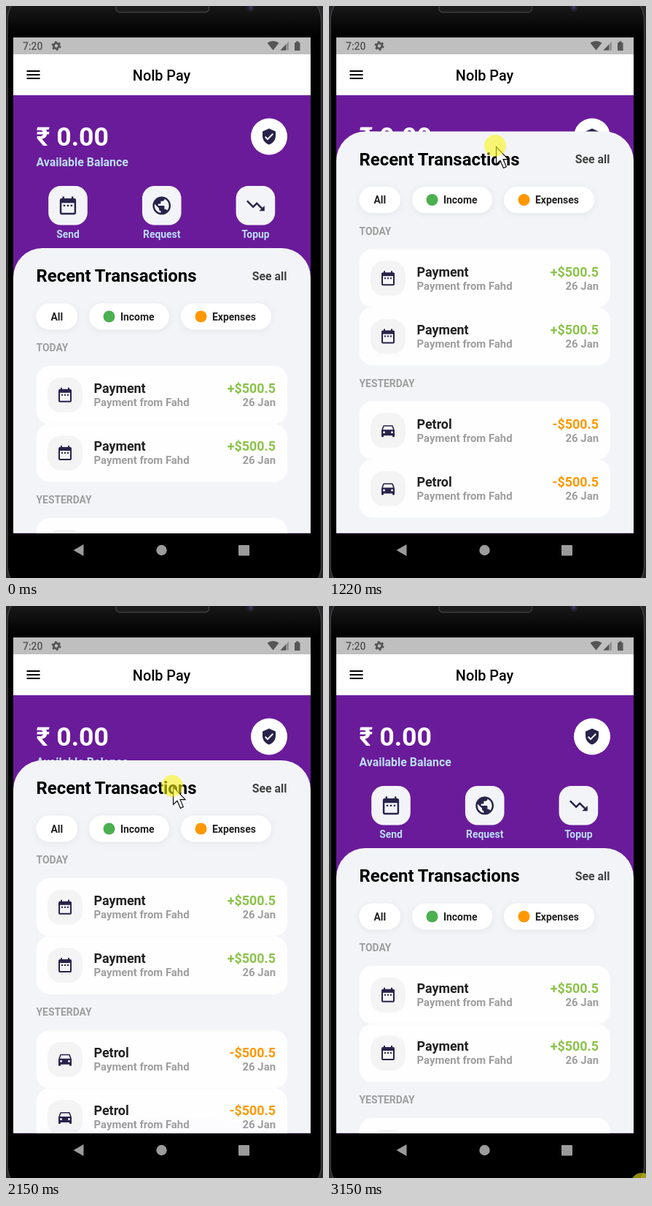
An HTML page for the animation above (3.23 s loop, 435 by 782 pixels).

```html
<!DOCTYPE html>
<html lang="en">
<head>
<meta charset="utf-8">
<title>Wallet</title>
<style>
  html, body { margin: 0; width: 100%; height: 100%; overflow: hidden; background: #29292b; }
  svg { display: block; width: 435px; height: 782px; font: 700 13.9px Roboto, sans-serif; }
  .mid { text-anchor: middle; }
  .end { text-anchor: end; }
  .ink { fill: #29234b; fill-rule: evenodd; }
  .tint { fill: #bbdefb; }
  .big { font-size: 35.7px; fill: #fff; }
  .h1 { font-size: 23.9px; }
  .h2 { font-size: 17.9px; fill: #212121; }
  .sub { font-size: 14.9px; }
  .label { font-size: 15.87px; }
  .grey { fill: #9e9e9e; }
  .chip { fill: #fff; filter: drop-shadow(0 2px 5px rgba(0, 0, 0, .06)); }
  .status { fill: #555; }
</style>
</head>
<body>
<svg viewBox="0 0 435 782">
  <defs>
    <linearGradient id="bezel" x2="0" y2="1">
      <stop stop-color="#181819"/><stop offset="1" stop-color="#000"/>
    </linearGradient>
    <clipPath id="phone"><rect x="2" y="-20" width="430.5" height="825" rx="40"/></clipPath>
    <clipPath id="page"><rect x="10" y="122" width="408" height="598.7"/></clipPath>
    <clipPath id="under"><rect x="10" y="331" width="408" height="390"/></clipPath>
    <path id="menu" d="M3 18h18v-2H3zM3 13h18v-2H3zM3 6v2h18V6z"/>
    <path id="date" d="M5 4h14q2 0 2 2v14q0 2-2 2H5q-2 0-2-2V6q0-2 2-2zM6 2h2v2H6zM16 2h2v2h-2zM5 9v11h14V9zM7 11h2v2H7zM11 11h2v2h-2zM15 11h2v2h-2z"/>
    <path id="globe" d="M12 2C6.48 2 2 6.48 2 12s4.48 10 10 10 10-4.48 10-10S17.52 2 12 2zm-1 17.93c-3.95-.49-7-3.85-7-7.93 0-.62.08-1.21.21-1.79L9 15v1c0 1.1.9 2 2 2zm6.9-2.54c-.26-.81-1-1.39-1.9-1.39h-1v-3c0-.55-.45-1-1-1H8v-2h2c.55 0 1-.45 1-1V7h2c1.1 0 2-.9 2-2v-.41c2.93 1.19 5 4.06 5 7.41 0 2.08-.8 3.97-2.1 5.39z"/>
    <path id="trend" d="M16 18l2.29-2.29-4.88-4.88-4 4L2 7.41 3.41 6l6 6 4-4 6.3 6.29L22 12v6z"/>
    <path id="shield" d="M12 1L3 5v6c0 5.55 3.84 10.74 9 12 5.16-1.26 9-6.45 9-12V5zm-2 16l-4-4 1.41-1.41L10 14.17l6.59-6.59L18 9z"/>
    <path id="car" d="M5 6q.5-1 1.5-1h11q1 0 1.5 1L21 12v8q0 1-1 1h-1q-1 0-1-1v-1H6v1q0 1-1 1H4q-1 0-1-1v-8zM6.500 6.500L5 11h14l-1.500-4.500zM5 14.500a1.500 1.500 0 0 1 3 0a1.500 1.500 0 0 1-3 0zM16 14.500a1.500 1.500 0 0 1 3 0a1.500 1.500 0 0 1-3 0z"/>
  </defs>

  <!-- Phone body -->
  <g clip-path="url(#phone)">
    <rect width="435" height="782"/>
    <rect width="435" height="42" fill="url(#bezel)"/>
    <rect x="151" y="-10" width="127.500" height="18.500" rx="5" fill="#1c1c1d" stroke="#3d3d3f" stroke-width="1.500"/>
    <circle cx="336" cy="2" r="5.500" fill="#20202f"/>
    <circle cx="336" cy="2" r="2.500" fill="#34345a"/>
  </g>
  <rect x="2" y="-20" width="430.500" height="825" rx="40" fill="none" stroke="#3e3e40" stroke-width="1.500"/>

  <!-- Status bar -->
  <rect x="10" y="43" width="408" height="23.500" fill="#bfbfbf"/>
  <g class="status">
    <text x="23" y="59.500" font-weight="500">7:20</text>
    <g fill="none" stroke="#555">
      <circle cx="69" cy="54.500" r="3.600" stroke-width="2.800"/>
      <circle cx="69" cy="54.500" r="5.600" stroke-width="1.900" stroke-dasharray="2.930"/>
    </g>
    <path d="M358.500 50.500Q366.500 45 374.500 50.500L366.500 60.500Z"/>
    <path d="M388 48.500V60.500H376.500Z" fill="#929292"/>
    <path d="M384 52.700V60.500H376.500Z"/>
    <path d="M396 50h2v-1.700h3.500V50h2v11H396z"/>
  </g>

  <!-- App bar -->
  <rect x="10" y="66" width="408" height="56" fill="#fff"/>
  <use href="#menu" x="25.500" y="82"/>
  <text class="mid" x="213.500" y="101.500" style="font-size:19.84px;font-weight:500">Nolb Pay</text>

  <!-- Balance page -->
  <g clip-path="url(#page)">
    <rect x="10" y="122" width="408" height="600" fill="#6a1b9a"/>
    <text class="big" x="41.500" y="190.700">₹ 0.00</text>
    <text class="label tint" x="41.500" y="218.500">Available Balance</text>
    <circle cx="361" cy="178.500" r="25" fill="#fff"/>
    <use href="#shield" class="ink" x="349" y="166.500"/>
    <g id="actions"></g>

    <g id="sheet">
      <rect x="10" y="331" width="408" height="680" rx="40" fill="#f3f4f8"/>
      <text class="h1" x="41.500" y="377">Recent Transactions</text>
      <text class="label end" x="385.500" y="374.500" fill="#424242">See all</text>
      <g id="chips"></g>
      <g id="days"></g>
    </g>

    <g clip-path="url(#under)" fill="#6a1b9a">
      <circle id="topGlow" cx="214" r="880"/>
      <circle id="endGlow" cx="214" r="880"/>
    </g>
  </g>

  <!-- Navigation bar -->
  <g fill="#9b9b9b">
    <path d="M92.500 744L106.500 736V752Z"/>
    <circle cx="213.500" cy="744" r="7.200"/>
    <rect x="319" y="737" width="15" height="14.500" rx="1"/>
  </g>

  <g id="pointer">
    <path d="M.5.5V24.500L6 19.300 10.400 29.500 14.300 27.800 10 17.600H17Z" fill="#fff" stroke="#000" stroke-width="1.100"/>
    <circle id="press" cx="-1" cy="-1" r="15" fill="rgb(252,246,10)" fill-opacity=".56"/>
  </g>
</svg>

<script>
const $ = id => document.getElementById(id);
const clamp = (v, lo, hi) => Math.max(lo, Math.min(hi, v));
const LOOP = 3230, ROW = 79.4, MAX_SHIFT = 210;

const action = ([icon, name], i) => {
  const x = 85 + 128.7 * i;
  return `
    <rect x="${x - 26.8}" y="246" width="53.6" height="53.6" rx="17" fill="#f3f4f8"/>
    <use href="#${icon}" class="ink" transform="translate(${x - 14.9} 258) scale(1.24)"/>
    <text class="mid tint" x="${x}" y="316.5">${name}</text>`;
};

const chip = ([name, x, width, dot]) => `
  <rect class="chip" x="${x}" y="406.5" width="${width}" height="36" rx="18"/>
  ${dot ? `<circle cx="${x + 27.5}" cy="424.5" r="8" fill="${dot}"/>` : ''}
  <text x="${x + (dot ? 43 : 20)}" y="429.7" fill="#212121">${name}</text>`;

const row = (y, { icon, name, amount, color }) => `
  <g transform="translate(0 ${y})">
    <rect x="41.5" width="344.5" height="${ROW}" rx="18" fill="#fefefe"/>
    <rect x="57" y="16" width="48" height="47.6" rx="18" fill="#f4f4f5"/>
    <use href="#${icon}" class="ink" x="69" y="27.7"/>
    <text class="h2" x="120.5" y="37">${name}</text>
    <text class="sub grey" x="120.5" y="55">Payment from Fahd</text>
    <text class="h2 end" x="370" y="37" style="fill:${color}">${amount}</text>
    <text class="sub grey end" x="370" y="55">26 Jan</text>
  </g>`;

const day = (item, i) => {
  const y = 492 + 208 * i;
  return `<text class="grey" x="41.5" y="${y - 20}">${item.day}</text>` + row(y, item) + row(y + ROW, item);
};

const fill = (id, items, make) => { $(id).innerHTML = items.map(make).join(''); };
fill('actions', [['date', 'Send'], ['globe', 'Request'], ['trend', 'Topup']], action);
fill('chips', [['All', 41.5, 56.5], ['Income', 114, 110, '#4caf50'], ['Expenses', 240, 124, '#ff9800']], chip);
fill('days', [
  { day: 'TODAY', icon: 'date', name: 'Payment', amount: '+$500.5', color: '#8bc34a' },
  { day: 'YESTERDAY', icon: 'car', name: 'Petrol', amount: '-$500.5', color: '#ff9800' }
], day);

// Pointer strokes, each shown in a few even steps; grab is the height at which the sheet is held
const strokes = [
  { start: 350, end: 580, steps: 4, from: [376, 549], to: [232, 364] },
  { start: 750, end: 1220, steps: 7, from: [229, 364], to: [229, 192], power: 2.1, grab: 351.5 },
  { start: 1300, end: 1450, steps: 3, from: [229, 140], to: [229, 110], power: .6, grab: 351.5 },
  { start: 1920, end: 2380, steps: 7, from: [229, 122], to: [229, 372], grab: 367 },
  { start: 2460, end: 2610, steps: 3, from: [229, 398], to: [377, 601] },
  { start: 2690, end: 2850, steps: 3, from: [377, 601], to: [377, 601] },
  { start: 3080, end: 3150, steps: 2, from: [412, 730], to: [430, 791], press: true }
];

function pose(now) {
  const s = strokes.filter(k => k.start <= now).pop();
  if (!s) return { t: 0, x: 0, y: 0, shift: 0, hidden: true };
  const gap = (s.end - s.start) / (s.steps - 1);
  const step = Math.min(s.steps - 1, Math.floor((now - s.start + 4) / gap));
  const p = (step / (s.steps - 1)) ** (s.power || 1);
  const [x, y] = s.from.map((a, i) => a + (s.to[i] - a) * p);
  const shift = s.grab ? clamp(y - s.grab, -MAX_SHIFT, 0) : 0;
  return { t: s.start + step * gap, x, y, shift, press: s.press || s.grab };
}

// Rises from start to full, fades from fade to end
const swell = (t, start, full, fade, end) =>
  clamp(Math.min((t - start) / (full - start), (end - t) / (end - fade)), 0, 1);

function setGlow(id, cy, alpha) {
  $(id).setAttribute('cy', cy);
  $(id).setAttribute('fill-opacity', alpha);
}

function draw() {
  const { t, x, y, shift, press, hidden } = pose(performance.now() % LOOP);
  $('pointer').setAttribute('transform', `translate(${x} ${y})`);
  $('pointer').setAttribute('visibility', hidden ? 'hidden' : 'visible');
  $('press').setAttribute('opacity', press ? 1 : 0);
  $('sheet').setAttribute('transform', `translate(0 ${shift})`);
  const top = swell(t, 2300, 2500, 2500, 3080);
  const end = swell(t, 1220, 1450, 1920, 2300);
  setGlow('topGlow', 331 + 76 * top - 880, .167 * top);
  setGlow('endGlow', 720 - 53 * end + 880, .03 * end);
  requestAnimationFrame(draw);
}
draw();
</script>
</body>
</html>
```
